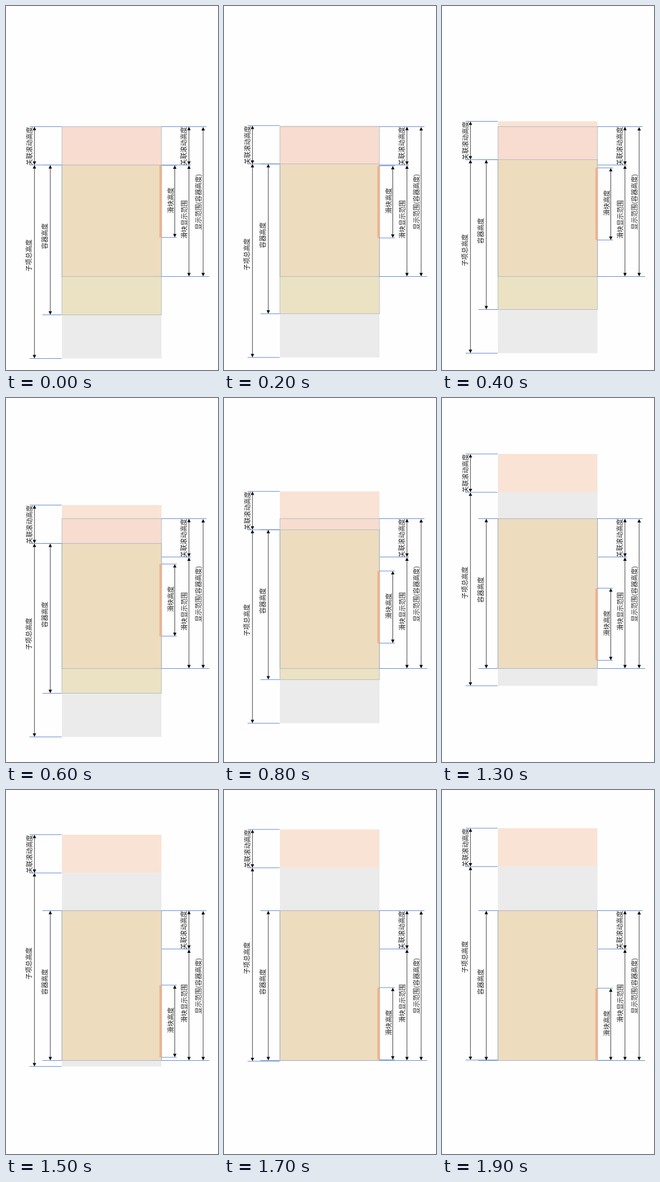
These frames come from a looping animation (360x617 px, 2 s). An HTML page with a canvas:

```html
<!DOCTYPE html>
<html lang="zh-CN">
<head>
<meta charset="utf-8">
<title>滚动高度示意</title>
<style>
html, body { margin: 0; width: 100%; height: 100%; overflow: hidden; background: #fefefe; }
canvas { display: block; width: 360px; height: 617px; }
</style>
</head>
<body>
<canvas id="stage"></canvas>
<script>
const canvas = document.getElementById('stage');
const ctx = canvas.getContext('2d');
const ratio = window.devicePixelRatio || 1;
canvas.width = 360 * ratio;
canvas.height = 617 * ratio;
ctx.scale(ratio, ratio);

const LOOP = 2000, STEP = 100;
const LEFT = 95, RIGHT = 264;
const VIEW_TOP = 204.5, VIEW_BOTTOM = 458.5, VIEW_H = VIEW_BOTTOM - VIEW_TOP;
const HEAD_H = 65, LIST_H = 328, THUMB_H = 122.3;
const FONT = '"Noto Sans CJK SC", "Noto Sans CJK", "Noto Sans", sans-serif';

const times = [0, 400, 600, 800, 1100, 1500, 1900];
const scrollCurve = curve(times, [0, 9, 23, 46.2, 85.2, 128.8, 139.7]);
const thumbCurve = curve(times, [0, 4.4, 11.4, 23.2, 41.5, 60.8, 66]);

// Smooth cubic through a few points, at rest at both ends
function curve(ts, vs) {
  const slope = i => (vs[i + 1] - vs[i]) / (ts[i + 1] - ts[i]);
  const tangent = vs.map((_, i) => {
    if (i === 0 || i === vs.length - 1) return 0;
    const a = ts[i] - ts[i - 1], b = ts[i + 1] - ts[i];
    return (slope(i - 1) * b + slope(i) * a) / (a + b);
  });
  return t => {
    let i = 0;
    while (i < ts.length - 2 && t > ts[i + 1]) i++;
    const h = ts[i + 1] - ts[i];
    const s = Math.min(1, (t - ts[i]) / h), s2 = s * s, s3 = s2 * s;
    return vs[i] + (vs[i + 1] - vs[i]) * (3 * s2 - 2 * s3)
      + h * (tangent[i] * (s3 - 2 * s2 + s) + tangent[i + 1] * (s3 - s2));
  };
}

function fill(color, x, top, bottom, right = RIGHT) {
  if (bottom <= top) return;
  ctx.fillStyle = color;
  ctx.fillRect(x, top, right - x, bottom - top);
}

function outline(top, height) {
  ctx.strokeStyle = '#a6b4c0';
  ctx.lineWidth = 0.8;
  ctx.strokeRect(LEFT, top, RIGHT - LEFT, height);
}

function line(x1, y1, x2, y2, color, width) {
  ctx.strokeStyle = color;
  ctx.lineWidth = width;
  ctx.beginPath();
  ctx.moveTo(x1, y1);
  ctx.lineTo(x2, y2);
  ctx.stroke();
}

function guide(x1, x2, y) {
  line(x1, y, x2, y, '#5b84cc', 0.9);
}

function tip(x, y, dir) {
  ctx.fillStyle = '#000';
  ctx.beginPath();
  ctx.moveTo(x, y);
  ctx.lineTo(x - 2.9, y + 5.6 * dir);
  ctx.lineTo(x + 2.9, y + 5.6 * dir);
  ctx.fill();
}

function arrow(x, top, bottom) {
  line(x, top + 4, x, bottom - 4, '#222', 0.85);
  tip(x, top + 0.3, 1);
  tip(x, bottom - 0.3, -1);
}

function label(text, x, y) {
  ctx.save();
  ctx.translate(x, y);
  ctx.rotate(-Math.PI / 2);
  ctx.font = '10.9px ' + FONT;
  ctx.textAlign = 'center';
  ctx.textBaseline = 'middle';
  ctx.fillStyle = '#222';
  ctx.fillText(text, 0, 0);
  ctx.restore();
}

function draw(t) {
  const headTop = VIEW_TOP - scrollCurve(t);
  const listTop = headTop + HEAD_H;
  const listBottom = listTop + LIST_H;
  const boxTop = Math.max(VIEW_TOP, listTop);
  const boxBottom = boxTop + VIEW_H;
  const thumbTop = VIEW_TOP + HEAD_H + 0.5 + thumbCurve(t);
  const thumbBottom = thumbTop + THUMB_H;
  const fixedSplit = VIEW_TOP + HEAD_H;

  ctx.fillStyle = '#fefefe';
  ctx.fillRect(0, 0, 360, 617);

  fill('#f9e3d5', LEFT, headTop, listTop);
  fill('#ebebeb', LEFT, listTop, listBottom);
  fill('#f8dccf', LEFT, VIEW_TOP, listTop);
  fill('#ebe2c3', LEFT, boxTop, boxBottom);
  fill('#eedcbf', LEFT, boxTop, VIEW_BOTTOM);
  outline(boxTop, VIEW_H);
  outline(VIEW_TOP, VIEW_H);
  fill('#f2b08a', 260.5, thumbTop, thumbBottom, 264.2);

  // Left measures
  for (const y of [headTop, listTop, listBottom]) guide(40, 94.5, y);
  for (const y of [boxTop, boxBottom]) guide(62, 94.5, y);
  arrow(48.3, headTop, listTop);
  arrow(48.3, listTop, listBottom);
  arrow(75.2, boxTop, boxBottom);
  label('关联滚动高度', 39.7, headTop + 33);
  label('子项总高度', 39.2, listTop + 153.3);
  label('容器高度', 66, boxTop + 120.7);

  // Right measures
  guide(264, 340.5, VIEW_TOP);
  guide(265, 314, fixedSplit);
  guide(264, 345, VIEW_BOTTOM);
  guide(264, 290, thumbTop);
  guide(264, 290, thumbBottom);
  arrow(286.6, thumbTop, thumbBottom);
  arrow(310.7, VIEW_TOP, fixedSplit);
  arrow(310.7, fixedSplit + 0.5, VIEW_BOTTOM);
  arrow(334.8, VIEW_TOP + 0.5, VIEW_BOTTOM);
  label('滑块高度', 279.5, thumbTop + 59.4);
  label('关联滚动高度', 302, VIEW_TOP + 33);
  label('滑块显示范围', 302.8, 361.7);
  label('显示范围(容器高度)', 327, 332);
}

const start = performance.now();
function tick() {
  const t = (performance.now() - start) % LOOP;
  draw(Math.floor(t / STEP) * STEP);
  requestAnimationFrame(tick);
}
tick();
</script>
</body>
</html>
```
